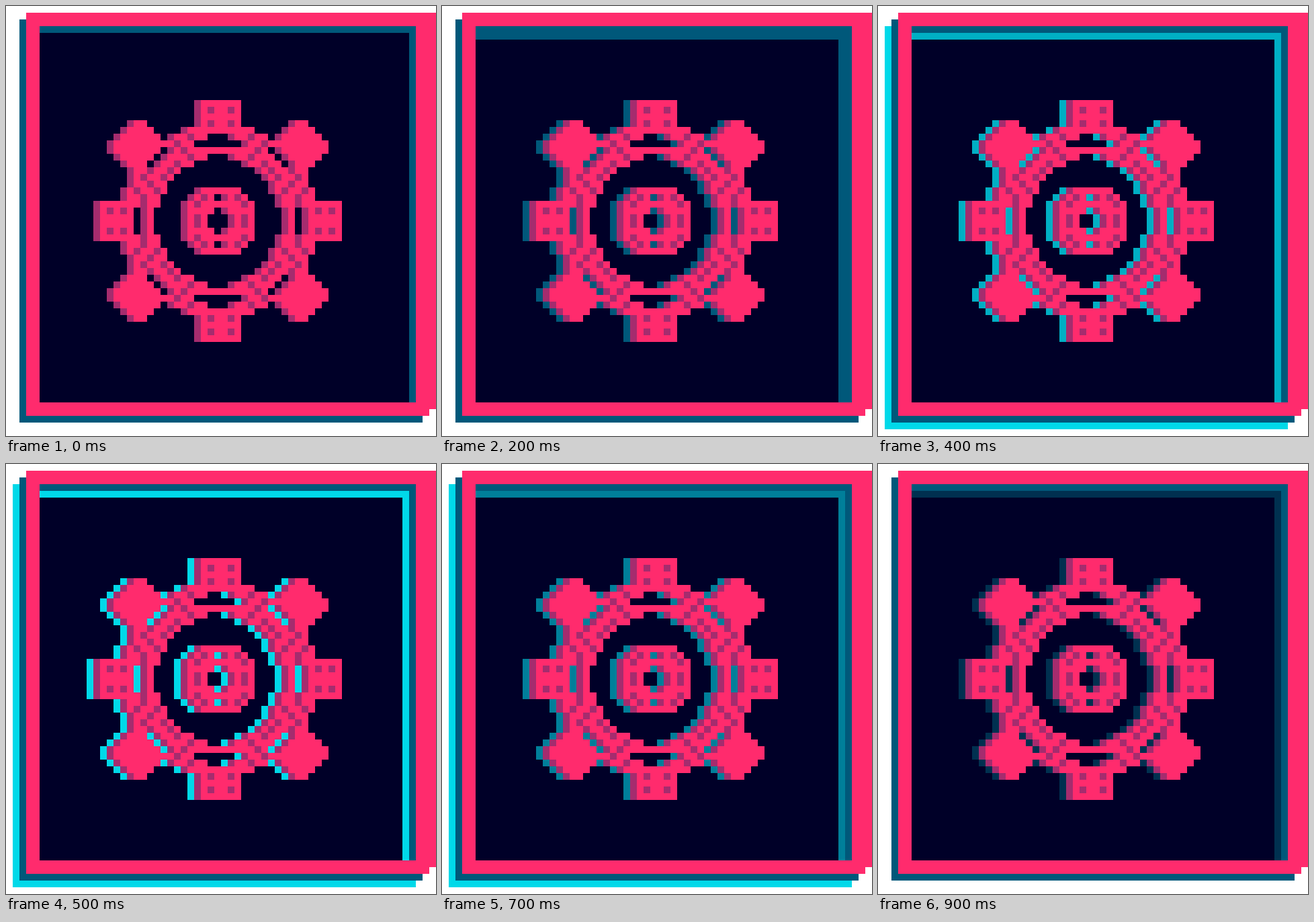
An HTML page with a canvas that plays this animation: 640x640 px, repeating every 1 s.

```html
<!DOCTYPE html>
<html>
<head>
<meta charset="utf-8">
<style>
html, body { margin: 0; width: 100%; height: 100%; overflow: hidden; background: #fff; }
canvas { display: block; width: 640px; height: 640px; }
</style>
</head>
<body>
<canvas width="640" height="640"></canvas>
<script>
const ctx = document.querySelector('canvas').getContext('2d');
const PINK = '#ff2b6d', PURPLE = '#a52c6e', TEAL = '#00587a', CYAN = '#00d9e9', NIGHT = '#000028';
const GLOW = [NIGHT, '#003050', TEAL, '#007f9a', '#00afc4', CYAN];

// The gear is mirrored on both axes and both diagonals:
// a is the larger, b the smaller distance in cells from the middle.
function isHole(a, b) {
  const sum = a + b;
  const hub = (a < 2 && b === 0) || (a === 3 && b % 2 === 0);
  const slot = a > 10 && b < 26 - 2 * a;
  const gap = (sum === 17 && a < 12) || (sum === 18 && a < 11);
  const groove = sum === 14 && a < 9;
  const rivet = b === 1 && (a === 14 || a === 16);
  const stud = ['12,4', '10,5', '9,4'].includes(a + ',' + b);
  return hub || slot || gap || groove || rivet || stud;
}

function inGear(x, y) {
  const u = Math.floor(Math.abs(x - 31.5)), v = Math.floor(Math.abs(y - 31.5));
  const a = Math.max(u, v), b = Math.min(u, v);
  const r2 = (a + 0.5) ** 2 + (b + 0.5) ** 2;
  const rim = a + 0.45 * b > 9.6 && r2 < 205;
  const hub = r2 < 30;
  const tooth = a > 12 && a < 18 && b < 3;
  const knob = Math.abs(u - 11.5) + Math.abs(v - 10.5) <= 4;
  return (rim || hub || tooth || knob) && !isHole(a, b);
}

const cells = [];
for (let y = 14; y < 50; y++)
  for (let x = 14; x < 50; x++)
    if (inGear(x, y)) cells.push([x, y]);

// All lengths in cells of 10 px
function rect(color, x, y, w, h = w) {
  ctx.fillStyle = color;
  ctx.fillRect(x * 10, y * 10, w * 10, h * 10);
}

function gear(color, shift) {
  for (const [x, y] of cells) rect(color, x - shift, y, 1);
}

function draw(step) {
  const glow = GLOW[Math.min(step, 10 - step)];
  const edge = step === 6 ? PURPLE : TEAL;
  rect('#fff', 0, 0, 64);
  if (step > 2 && step < 8) rect(CYAN, 1, 3, 60);
  rect(edge, 2, 2, 60);
  rect(PINK, 3, 1, 60);
  rect(PINK, 4, 1, 60, 59);
  rect(edge, 5, 3, 56);
  rect(glow, 5, 4, 55);
  rect(NIGHT, 5, 5, 54);
  gear(glow, 2);
  gear(PURPLE, 1);
  gear(PINK, 0);
}

function frame(now) {
  draw(Math.floor(now % 1000 / 100));
  requestAnimationFrame(frame);
}
frame(performance.now());
</script>
</body>
</html>
```
